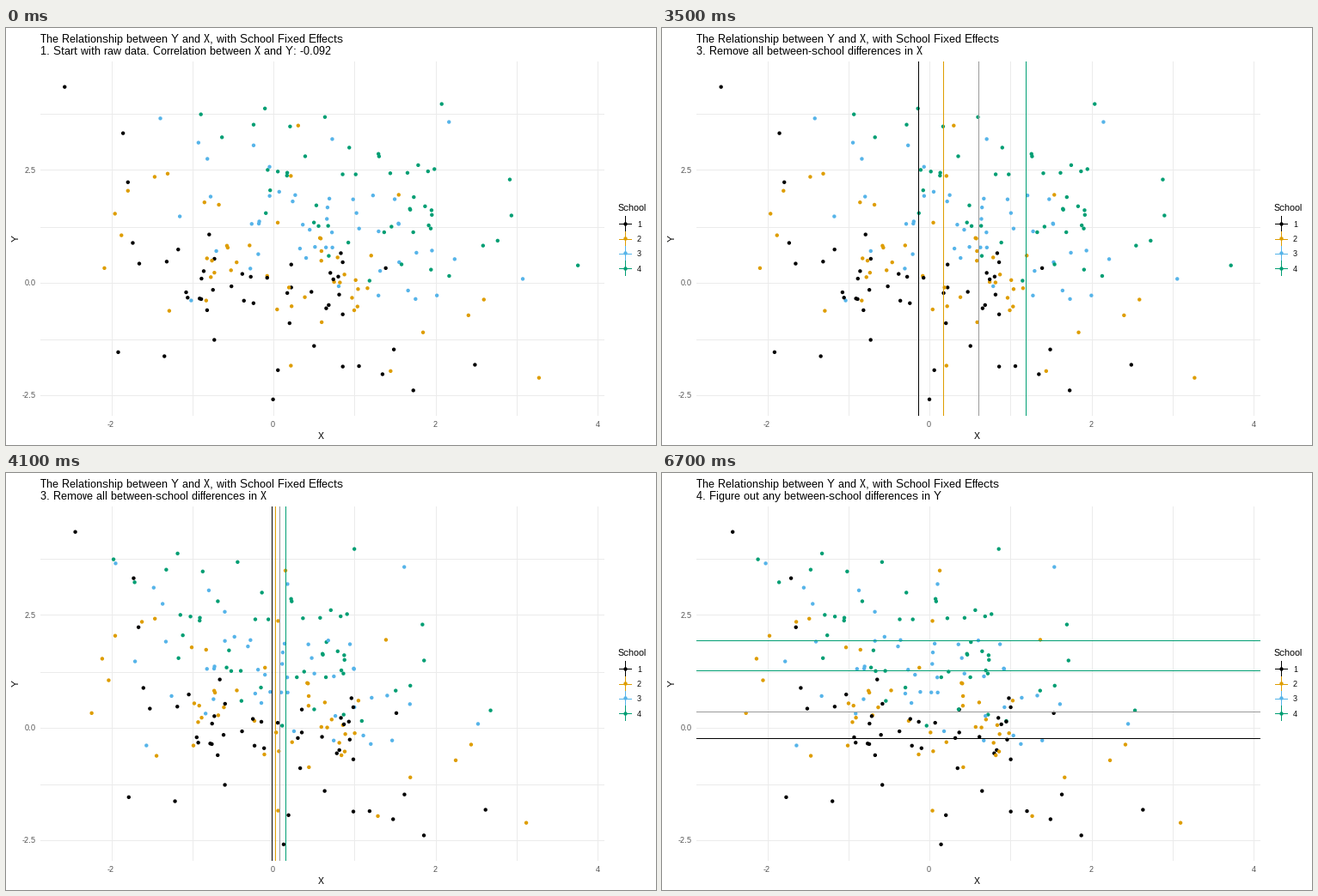
Animation of 756 by 486 pixels, one loop 8000 ms. Source, as a matplotlib script:

```python
import numpy as np
import matplotlib.pyplot as plt
from matplotlib.animation import FuncAnimation

W, H, DPI = 756, 486, 100
plt.rcParams["font.family"] = "Liberation Sans"
plt.rcParams["text.hinting"] = "native"
plt.rcParams["text.hinting_factor"] = 1

BLACK, ORANGE, BLUE, GREEN = "#000000", "#DE9D00", "#56B4E9", "#009E73"
COLORS = [BLACK, ORANGE, BLUE, GREEN]
LEFT, RIGHT, TOP, BOTTOM = 40, 695, 39, 451
PER_SCHOOL = 50

X_MEANS = np.array([-0.148, 0.178, 0.625, 1.22])
Y_MEANS = np.array([-0.229, 0.363, 1.279, 1.947])

# Outlying points of each school; the dense middle is sampled.
OUTLIERS = [
    [(-2.57, 4.35), (-1.85, 3.32), (-1.79, 2.23), (-1.73, .88),
     (-1.91, -1.55), (-1.34, -1.64), (-1.65, .42), (0, -2.6),
     (.06, -1.95), (1.73, -2.4), (2.49, -1.83), (1.49, -1.49),
     (.86, -1.87), (1.35, -2.04), (1.39, .32), (1.06, -1.86)],
    [(-2.08, .32), (-1.95, 1.53), (-1.79, 2.04), (-1.46, 2.35),
     (-1.3, 2.42), (-1.28, -.63), (.31, 3.49), (.22, 2.37),
     (1.55, 1.95), (1.85, -1.11), (2.41, -.73), (2.6, -.38),
     (3.28, -2.12), (1.45, -1.97), (.22, -1.85), (-1.87, 1.05)],
    [(-1.39, 3.65), (-.92, 3.11), (-.81, 2.75), (-.77, 1.91),
     (-1.15, 1.47), (-1.01, -.4), (-.24, 3.05), (.73, 3.19),
     (2.17, 3.57), (3.08, .08), (2.24, .52), (1.96, .71),
     (-.7, .7), (1.3, -.29), (-.28, .31), (1.55, 1.3)],
    [(-.89, 3.74), (-.63, 3.23), (-.1, 3.87), (-.24, 3.51),
     (.21, 3.47), (.64, 3.68), (.94, 3), (1.3, 2.86),
     (2.08, 3.97), (1.79, 2.61), (2.92, 2.29), (2.94, 1.49),
     (3.76, .38), (2.77, .93), (2.59, .82), (1.19, .04)],
]

TITLE = "The Relationship between Y and X, with School Fixed Effects"
STEPS = [
    "1. Start with raw data. Correlation between X and Y: -0.092",
    "2. Figure out any between-school differences in X",
    "3. Remove all between-school differences in X",
    "4. Figure out any between-school differences in Y",
]


def px(x):
    return 310.6 + 94.3 * np.asarray(x)


def py(y):
    return 296.6 - 52.4 * np.asarray(y)


def make_school(outliers, center, rng):
    """Fill the middle of a school so that its mean equals center."""
    outer = np.array(outliers)
    count = PER_SCHOOL - len(outer)
    x = rng.uniform(-1.15, 1.15, count)
    y = -0.3 * x + np.clip(rng.normal(0, 0.62, count), -1.2, 1.2)
    core = np.column_stack([x, y])
    core_mean = (PER_SCHOOL * center - outer.sum(axis=0)) / count
    core += core_mean - core.mean(axis=0)
    return np.vstack([outer, core])


rng = np.random.default_rng(12)
centers = np.column_stack([X_MEANS, Y_MEANS])
schools = np.stack(
    [make_school(o, c, rng) for o, c in zip(OUTLIERS, centers)], axis=1)

fig = plt.figure(figsize=(W / DPI, H / DPI), dpi=DPI, facecolor="white")
ax = fig.add_axes([0, 0, 1, 1])
ax.set_xlim(0, W)
ax.set_ylim(H, 0)
ax.axis("off")


def line(xs, ys, color, z):
    return ax.plot(xs, ys, color=color, lw=0.72, zorder=z,
                   antialiased=False, solid_capstyle="butt")[0]


def text(x, y, s, size, color="black", **kw):
    return ax.text(x, y, s, fontsize=size * 0.72, color=color, **kw)


def pixel(v):
    return np.floor(v) + 0.5


# Grid and axes
for gx in range(-2, 5):
    line([pixel(px(gx))] * 2, [TOP, BOTTOM], "#EBEBEB", 1)
for gy in np.arange(-2.5, 4, 1.25):
    line([LEFT, RIGHT], [pixel(py(gy))] * 2, "#EBEBEB", 1)
for gx in (-2, 0, 2, 4):
    text(px(gx), 465, str(gx), 9, "#4D4D4D", ha="center")
for gy in (-2.5, 0, 2.5):
    text(35, py(gy) + 3.6, f"{gy:.1f}", 9, "#4D4D4D", ha="right")
text(366.5, 479, "X", 11, ha="center")
text(11.5, 245, "Y", 11, ha="center", va="center", rotation=90)

# Legend
text(712, 213, "School", 11)
for i, color in enumerate(COLORS):
    ky = 227.9 + 17.28 * i
    line([719.5] * 2, [ky - 8.64, ky + 8.64], color, 2)
    line([713, 727], [pixel(ky)] * 2, color, 2)
    ax.scatter([719.8], [ky], s=10, c=color, linewidths=0, zorder=3)
    text(734, ky + 4, str(i + 1), 9)

text(40, 17, TITLE, 13)
subtitle = text(40, 31, "", 13)

dots = ax.scatter(np.zeros(4 * PER_SCHOOL), np.zeros(4 * PER_SCHOOL),
                  s=10, c=COLORS * PER_SCHOOL, linewidths=0, zorder=3)
v_lines = [line([0, 0], [TOP, BOTTOM], c, 4) for c in COLORS]
h_lines = [line([LEFT, RIGHT], [pixel(py(m))] * 2, c, 4)
           for m, c in zip(Y_MEANS, [BLACK, "#9A9A9A", GREEN, GREEN])]

STILL = [BLACK, "#9A9A9A", "#5A5A5A", "#6E6E6E"]
MOVING = [BLACK, ORANGE, "#9B9B9B", GREEN]
MERGED = ["#555555"] * 4


def update(frame):
    step = sum(frame >= start for start in (5, 35, 64))
    subtitle.set_text(STEPS[step])

    progress = np.clip((frame - 34) / 9, 0, 1)
    removed = (1 - np.cos(np.pi * progress)) / 2
    x = schools[..., 0] - removed * X_MEANS
    dots.set_offsets(np.column_stack(
        [px(x).ravel(), py(schools[..., 1]).ravel()]))

    colors = STILL if progress == 0 else MOVING if progress < 1 else MERGED
    for v, mean, color in zip(v_lines, X_MEANS, colors):
        v.set_xdata([pixel(px(mean * (1 - removed)))] * 2)
        v.set_color(color)
        v.set_visible(8 <= frame < 64)
    for h in h_lines:
        h.set_visible(frame >= 67)
    return [subtitle, dots, *v_lines, *h_lines]


anim = FuncAnimation(fig, update, frames=80, interval=100,
                     repeat=True, repeat_delay=0, blit=False)
plt.show()
```
